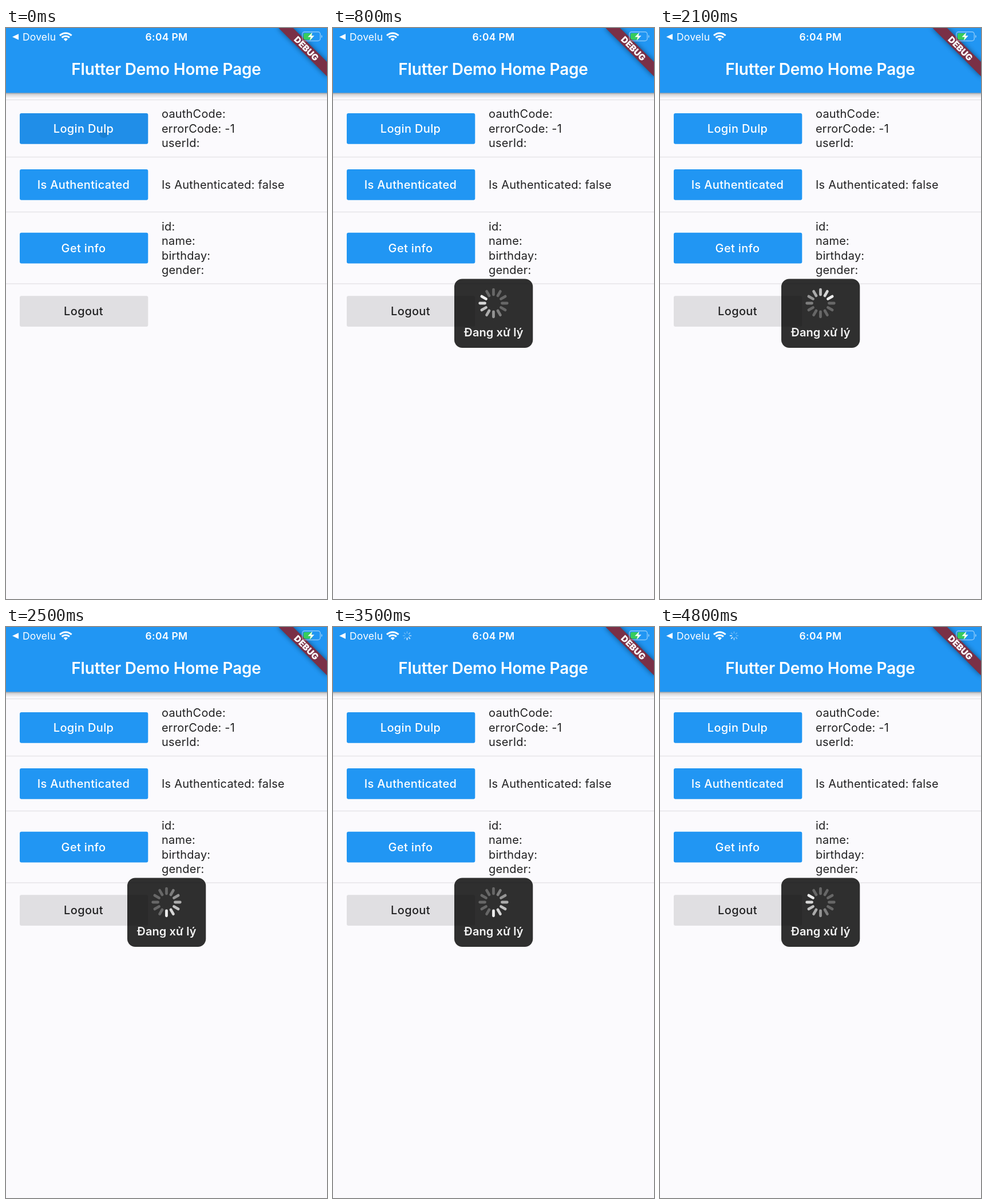
Animation of 561x998 px, one loop 5100 ms. Source, as an HTML page:

```html
<!DOCTYPE html>
<html lang="en">
<head>
<meta charset="utf-8">
<title>Login demo</title>
<style>
  html, body { margin: 0; width: 100%; height: 100%; overflow: hidden; background: #fbfafd; }
  svg { display: block; width: 100%; height: 100%; }
  text { font-family: Inter, Roboto, sans-serif; font-size: 20px; }
  .status { font-size: 17.5px; fill: #fff; letter-spacing: .2px; }
  .title { font-size: 28px; font-weight: 600; fill: #fff; letter-spacing: -.2px; text-anchor: middle; }
  .label { font-weight: 500; letter-spacing: .35px; text-anchor: middle; }
  .info { fill: #212122; letter-spacing: .2px; }
  .hud { font-weight: 600; fill: #f3f3f3; letter-spacing: .1px; text-anchor: middle; }
  .debug { font-size: 15.3px; font-weight: 900; fill: #fff; text-anchor: middle; }
</style>
</head>
<body>
<svg viewBox="0 0 561 998" preserveAspectRatio="none">
  <defs>
    <filter id="blur" x="-50%" y="-100%" width="200%" height="300%"><feGaussianBlur stdDeviation="5"/></filter>
    <linearGradient id="barShadow" x2="0" y2="1">
      <stop offset="0" stop-opacity=".38"/>
      <stop offset=".35" stop-opacity=".14"/>
      <stop offset="1" stop-opacity="0"/>
    </linearGradient>
  </defs>

  <rect width="561" height="998" fill="#fbfafd"/>
  <rect y="113" width="561" height="10" fill="url(#barShadow)"/>
  <rect width="561" height="113.4" fill="#2196f3"/>
  <text class="title" x="280" y="82.3">Flutter Demo Home Page</text>

  <g id="content"></g>
  <circle id="ripple" cx="171" cy="184" r="8" fill="#1b80d3"/>
  <g id="labels"></g>

  <g transform="translate(561 0) rotate(45)">
    <rect x="-60" y="41.9" width="120" height="17.9" opacity=".5" filter="url(#blur)"/>
    <rect x="-60" y="41.9" width="120" height="17.9" fill="#7a3046"/>
    <text class="debug" x="0" y="56.4">DEBUG</text>
  </g>

  <path d="M11 15.5L22 10.3V20.7Z" fill="#fff"/>
  <text class="status" x="29" y="21.8">Dovelu</text>
  <g fill="none" stroke="#fff" stroke-width="3.1">
    <path d="M94 13.2A14.6 14.6 0 0 1 114.6 13.2"/>
    <path d="M97.7 16.9A9.4 9.4 0 0 1 110.9 16.9"/>
    <path d="M104.3 23L100.6 19.3A5.3 5.3 0 0 1 108 19.3Z" fill="#fff" stroke="none"/>
  </g>
  <g id="network" stroke="#fff" stroke-width="1.6" stroke-linecap="round"></g>
  <text class="status" x="280.5" y="21.8" text-anchor="middle" font-weight="600" style="letter-spacing:.3px">6:04 PM</text>

  <rect x="517.8" y="6.8" width="31.5" height="15.8" rx="4.3" fill="none" stroke="#fff" stroke-opacity=".45" stroke-width="1.5"/>
  <path d="M551 12v5.5q1.8-.9 1.8-2.75T551 12Z" fill="#fff" fill-opacity=".5"/>
  <rect x="520" y="9" width="15" height="11.4" rx="2.3" fill="#37cb5d"/>
  <path d="M535.5 7.5L527.5 15.8H532.6L530.8 22L538.8 13.6H533.7Z" fill="#fff"/>

  <g id="hud">
    <rect x="212" y="438.4" width="137.3" height="120.6" rx="14" fill-opacity=".81"/>
    <g id="spinner" stroke="#fff" stroke-width="4.8" stroke-linecap="round"></g>
    <text class="hud" x="280.7" y="539.3">Đang xử lý</text>
  </g>
</svg>

<script>
const LOOP = 5100, STEP = 100;
const HUD_START = 800, NETWORK_START = 2900;
const HELD_TICKS = [13, 28, 30, 37];  // screen updates that repeat the one before
const LAST_TICK = 48;

const byId = id => document.getElementById(id);

function add(parent, tag, attrs, text = '') {
  const node = document.createElementNS('http://www.w3.org/2000/svg', tag);
  for (const key in attrs) node.setAttribute(key, attrs[key]);
  node.textContent = text;
  return byId(parent).appendChild(node);
}

function addButton(label, y, fill = '#2196f3', color = '#fff') {
  add('labels', 'text', { class: 'label', x: 135.5, y: y + 34.1, fill: color }, label);
  return add('content', 'rect', { x: 24, y, width: 224.3, height: 53.8, rx: 3, fill });
}

function addInfo(baseline, ...lines) {
  lines.forEach((line, i) =>
    add('content', 'text', { class: 'info', x: 272, y: baseline + i * 25.5 }, line));
}

function addSpokes(parent, count, cx, cy, inner, outer) {
  return Array.from({ length: count }, (_, i) => add(parent, 'line', {
    x1: cx, x2: cx, y1: cy - inner, y2: cy - outer,
    transform: `rotate(${i * 360 / count} ${cx} ${cy})`
  }));
}

// The head spoke is brightest; brightness fades counter-clockwise behind it.
function spin(spokes, turns, dim, bright) {
  const count = spokes.length, head = Math.floor(turns * count);
  spokes.forEach((spoke, i) => {
    const age = (head - i + count) % count;
    const glow = Math.max(0, 1 - age / (count / 2));
    spoke.setAttribute('stroke-opacity', dim + (bright - dim) * glow);
  });
}

for (const y of [125.5, 225.5, 321.5, 447])
  add('content', 'rect', { y: y - .7, width: 561, height: 1.5, fill: '#e5e4e8' });

const login = addButton('Login Dulp', 149);
addButton('Is Authenticated', 247);
addButton('Get info', 357.7);
addButton('Logout', 468.3, '#e0dfe2', '#212122');
addInfo(157.2, 'oauthCode:', 'errorCode: -1', 'userId:');
addInfo(280.8, 'Is Authenticated: false');
addInfo(353.5, 'id:', 'name:', 'birthday:', 'gender:');

const spinner = addSpokes('spinner', 12, 280.5, 481, 15, 23.8);
const network = addSpokes('network', 8, 129.5, 15.2, 4.2, 7);

function show(id, visible) {
  byId(id).style.display = visible ? '' : 'none';
}

function render(now) {
  const time = now % LOOP;
  let tick = Math.min(Math.floor(time / STEP), LAST_TICK);
  if (HELD_TICKS.includes(tick)) tick--;

  const pressed = time < STEP;
  login.setAttribute('fill', pressed ? '#208ee8' : '#2196f3');
  show('ripple', pressed);
  show('hud', time >= HUD_START);
  show('network', time >= NETWORK_START);

  const turns = (tick / 10 + .85 / 12) % 1;
  spin(spinner, turns, .27, .92);
  spin(network, turns, .3, .95);
}

const start = performance.now();
function loop() {
  render(performance.now() - start);
  requestAnimationFrame(loop);
}
loop();
</script>
</body>
</html>
```
